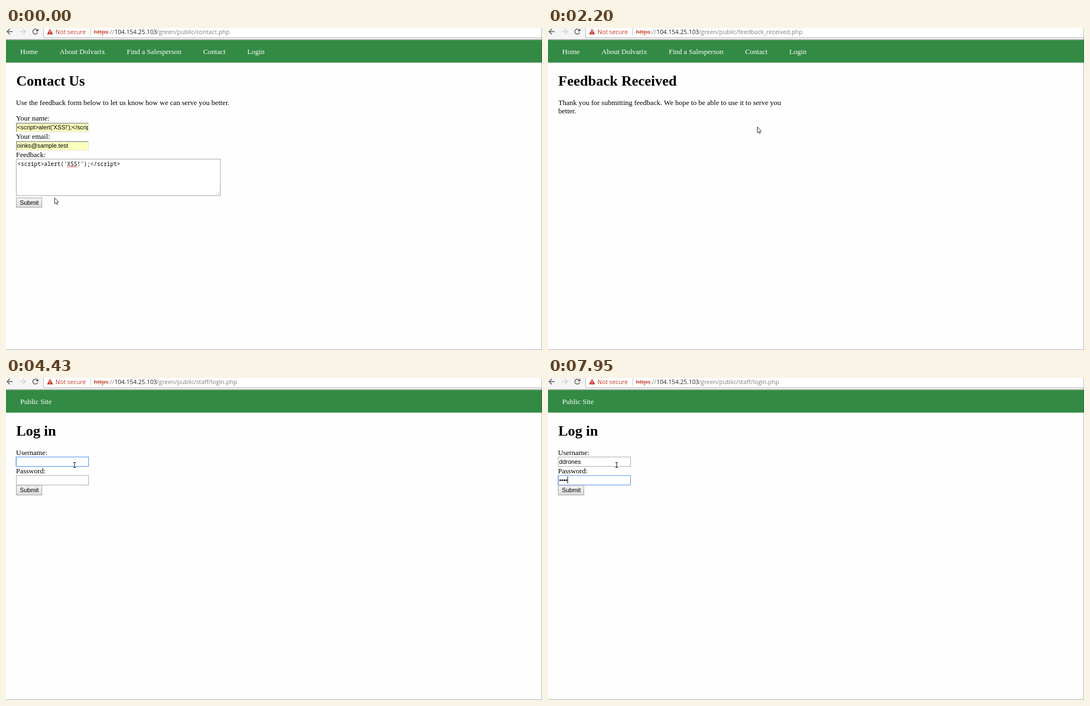
An HTML page with a canvas for the animation above (8 s loop, 964 by 581 pixels).

```html
<!DOCTYPE html>
<html lang="en">
<head>
<meta charset="utf-8">
<title>Feedback form and login</title>
<style>
html, body { margin: 0; width: 100%; height: 100%; overflow: hidden; background: #fefefe; }
canvas { display: block; }
</style>
</head>
<body>
<canvas id="stage" width="964" height="581"></canvas>
<script>
const ctx = document.getElementById('stage').getContext('2d');
const W = 964, H = 581, LOOP = 8000;
const TICK = 137.5;
const BLINK = 530;
const LEFT = 18;

const BODY = '13px "Liberation Serif", serif';
const HEADING = 'bold 26px "Liberation Serif", serif';
const FIELD = '10.83px "Liberation Sans", sans-serif';
const CODE = '9.93px "Noto Sans Mono", monospace';
const UI = '10.8px "Open Sans", sans-serif';
const HINT = 'bold 9.2px "Open Sans", sans-serif';
const ICON = '#5a5a5a', RED = '#c53929', GREY = '#808080', BLUE = '#4d8df0';

const USER = 'ddrones';
const SCRIPT = "<script>alert('XSS!');<\/script>";
const LINKS = ['Home', 'About Dolvarix', 'Find a Salesperson', 'Contact', 'Login'];

const PRESS = 760, SEND = 930, RECEIVED = 1620, RECEIVED_DONE = 1760;
const LOGIN_CLICK = 3080, LOGIN = 3200, LOGIN_DONE = 3330;
const userBox = { focus: 3900, blur: 5970, firstKey: 4830, gap: 165, value: USER };
const passBox = { focus: 5970, blur: LOOP, firstKey: 7110, gap: 280, value: '••••' };

const home = { x: 87, y: 306 };
const moves = [
  { start: 0, end: TICK, x: 103, y: 338 },
  { start: 300, end: 690, x: 57, y: 317 },
  { start: 825, end: 1375, x: 60, y: 325 },
  { start: 1375, end: 2200, x: 376, y: 178 },
  { start: 2200, end: 2612, x: 444, y: 42 },
  { start: 3300, end: 3850, x: 123, y: 157 }
];

const clamp = v => Math.min(1, Math.max(0, v));
const easeOut = p => 1 - (1 - p) ** 1.5;

function pointerAt(time) {
  const t = Math.floor(time / TICK) * TICK;
  return moves.reduce((pos, m) => {
    const p = easeOut(clamp((t - m.start) / (m.end - m.start)));
    return { x: Math.round(pos.x + (m.x - pos.x) * p), y: Math.round(pos.y + (m.y - pos.y) * p) };
  }, home);
}

function typing({ focus, blur, firstKey, gap, value }, t) {
  const count = Math.min(value.length, Math.max(0, Math.floor((t - firstKey) / gap) + 1));
  const active = count ? firstKey + (count - 1) * gap : focus;
  const focused = t >= focus && t < blur;
  const caret = focused && Math.floor((t - active) / BLINK) % 2 === 0;
  return { shown: value.slice(0, count), focused, caret };
}

function rect(x, y, w, h, color) {
  ctx.fillStyle = color;
  ctx.fillRect(x, y, w, h);
}

function frame(x, y, w, h, color) {
  ctx.strokeStyle = color;
  ctx.lineWidth = 1;
  ctx.strokeRect(x + .5, y + .5, w - 1, h - 1);
}

function text(str, x, y, font = BODY, color = '#000') {
  ctx.font = font;
  ctx.fillStyle = color;
  ctx.fillText(str, x, y);
  return x + ctx.measureText(str).width;
}

function line(points, color, width = 1) {
  ctx.beginPath();
  points.forEach(([x, y]) => ctx.lineTo(x, y));
  ctx.strokeStyle = color;
  ctx.lineWidth = width;
  ctx.stroke();
}

function shape(points, fill, outline) {
  ctx.beginPath();
  points.forEach(([x, y]) => ctx.lineTo(x, y));
  ctx.closePath();
  ctx.fillStyle = fill;
  ctx.fill();
  if (!outline) return;
  ctx.strokeStyle = outline;
  ctx.lineWidth = 1;
  ctx.stroke();
}

function arrowIcon(x, dir, color) {
  line([[x - 5 * dir, 6.5], [x + 5 * dir, 6.5]], color, 1.5);
  line([[x, 1.5], [x + 5 * dir, 6.5], [x, 11.5]], color, 1.5);
}

function reloadIcon(x, y) {
  ctx.beginPath();
  ctx.arc(x, y, 4.4, .35, 5.5);
  ctx.strokeStyle = ICON;
  ctx.lineWidth = 1.5;
  ctx.stroke();
  shape([[x + 5.5, y - 5.5], [x + 5.5, y - .5], [x + .5, y - .5]], ICON);
}

function stopIcon(x, y, r = 4.5) {
  for (const s of [-1, 1]) line([[x - r, y - r * s], [x + r, y + r * s]], ICON, 1.6);
}

function warningIcon(x) {
  shape([[x, 1.5], [x + 5.5, 11.5], [x - 5.5, 11.5]], RED);
  rect(x - .6, 5, 1.2, 3, '#fff');
  rect(x - .6, 9, 1.2, 1.2, '#fff');
}

function browserBar(path, loading) {
  rect(0, 0, W, 22, '#f5f5f5');
  rect(67, 0, W, 18, '#b8b8b8');
  rect(68, 0, W, 17, '#fff');
  rect(0, 20, W, 1.5, '#b8b8b8');
  arrowIcon(7, -1, ICON);
  arrowIcon(30, 1, '#cfcfcf');
  if (loading) stopIcon(53, 6.5);
  else reloadIcon(52.7, 6.5);
  warningIcon(79.2);
  text('Not secure', 89, 10.5, UI, RED);
  rect(152, 0, 1, 13, '#c4c4c4');
  const end = text('https', 158, 10.5, UI, RED);
  rect(158, 7, end - 158, 1, RED);
  text('://', end, 10.5, UI, GREY);
  text('104.154.25.103', 195, 10.5, UI, '#222');
  text('/green/public/' + path, 271, 10.5, UI, GREY);
}

function page(title, links) {
  rect(0, 21.5, W, 41, '#338a44');
  links.reduce((x, label) => text(label, x, 47, BODY, '#fff') + 39, 25.5);
  text(title, LEFT + .5, 104, HEADING);
}

function button(y, focused) {
  const fill = ctx.createLinearGradient(0, y, 0, y + 18);
  fill.addColorStop(0, '#f6f6f6');
  fill.addColorStop(1, '#dcdcdc');
  rect(LEFT, y, 47, 18, fill);
  frame(LEFT, y, 47, 18, focused ? '#777' : '#a3a3a3');
  text('Submit', 25, y + 12.5, FIELD);
}

function filledInput(y, value) {
  rect(LEFT, y, 131, 17, '#e4e4e4');
  rect(LEFT, y, 130, 16, '#9a9a9a');
  rect(LEFT + 1.6, y + 1.6, 128.4, 14.4, '#faffbd');
  ctx.save();
  ctx.beginPath();
  ctx.rect(LEFT, y, 130, 17);
  ctx.clip();
  text(value, 20, y + 12, FIELD);
  ctx.restore();
}

function loginInput(y, { shown, focused, caret }) {
  rect(LEFT, y, 131, 18, '#fff');
  frame(LEFT, y, 131, 18, focused ? BLUE : '#ababab');
  if (focused) rect(LEFT - 1, y, 1, 18, BLUE + '59');
  const end = text(shown, 20, y + 12.5, FIELD);
  if (caret) rect(Math.floor(end), y + 2, 1, 13, '#111');
}

function squiggle(x, y, width) {
  const points = [];
  for (let dx = 0; dx <= width; dx += .5) points.push([x + dx, y + .8 * Math.sin(dx * 2)]);
  line(points, '#e33');
}

function feedbackBox(y) {
  rect(LEFT, y, 368, 67, '#fff');
  frame(LEFT, y, 368, 67, '#a9a9a9');
  const before = SCRIPT.indexOf('XSS');
  text(SCRIPT, 20.8, y + 12.5, CODE);
  squiggle(20.8 + before * 5.96, y + 14.5, 18);
  for (const size of [6, 2.5]) line([[384 - size, y + 65], [384, y + 65 - size]], '#999', .8);
}

function contactPage(t) {
  browserBar('contact.php', t >= SEND);
  page('Contact Us', LINKS);
  text('Use the feedback form below to let us know how we can serve you better.', LEFT, 139);
  ['Your name:', 'Your email:', 'Feedback:'].forEach((label, i) => text(label, LEFT, 167 + 33 * i));
  filledInput(171, SCRIPT);
  filledInput(204, 'oinks@sample.test');
  feedbackBox(236);
  button(306, t >= PRESS);
}

function receivedPage(t) {
  browserBar('feedback_received.php', t < RECEIVED_DONE || t >= LOGIN_CLICK);
  page('Feedback Received', LINKS);
  text('Thank you for submitting feedback. We hope to be able to use it to serve you', LEFT + .5, 139);
  text('better.', LEFT + .5, 154);
}

function suggestions() {
  rect(LEFT, 160, 133, 41, '#e4e4e4');
  rect(LEFT + 1, 161, 131, 40, '#fff');
  for (const y of [174, 193.3]) text(USER, 25.5, y, HINT);
}

function loginPage(t) {
  const user = typing(userBox, t);
  browserBar('staff/login.php', t < LOGIN_DONE);
  page('Log in', ['Public Site']);
  text('Username:', LEFT, 139);
  text('Password:', LEFT, 172);
  loginInput(142, user);
  loginInput(175.5, typing(passBox, t));
  button(193.5, false);
  if (user.focused && user.shown) suggestions();
}

const cursors = {
  arrow() {
    shape([[.5, .5], [.5, 11], [2.8, 8.9], [4.3, 12.4], [6, 11.6], [4.6, 8.3], [7.6, 8.1]],
      '#fff', '#333');
  },
  hand() {
    ctx.beginPath();
    ctx.roundRect(3, .8, 2, 9, 1);
    ctx.roundRect(1.3, 6, 8.2, 8, 2.5);
    ctx.strokeStyle = '#222';
    ctx.lineWidth = 2;
    ctx.stroke();
    ctx.fillStyle = '#fff';
    ctx.fill();
  },
  beam() {
    line([[.5, -4], [.5, 4]], '#222');
    for (const y of [-4.5, 4.5]) line([[-2, y], [3, y]], '#222');
  }
};

function cursorKind({ x, y }, t) {
  if (y < 62) return 'hand';
  return t >= LOGIN && x < 149 && y > 142 ? 'beam' : 'arrow';
}

function draw(t) {
  rect(0, 0, W, H, '#fefefe');
  if (t < RECEIVED) contactPage(t);
  else if (t < LOGIN) receivedPage(t);
  else loginPage(t);
  rect(W - 1, 0, 1, H, 'rgba(0, 0, 0, .28)');
  rect(0, H - 1, W, 1, '#b0b0b0');
  const pos = pointerAt(t);
  ctx.save();
  ctx.translate(pos.x, pos.y);
  cursors[cursorKind(pos, t)]();
  ctx.restore();
}

const start = performance.now();
function tick() {
  draw((performance.now() - start) % LOOP);
  requestAnimationFrame(tick);
}
tick();
</script>
</body>
</html>
```
